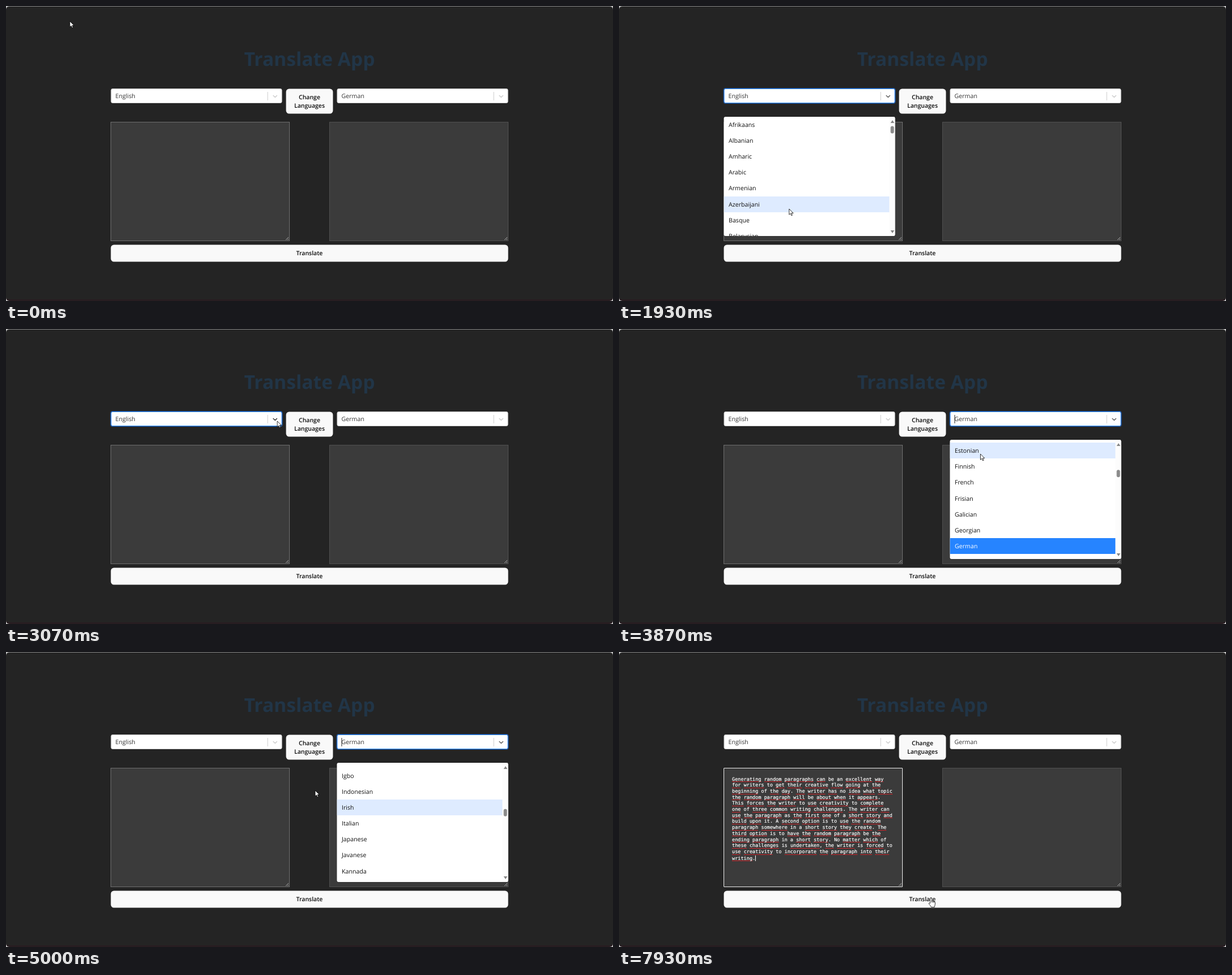
These frames come from a looping animation (1074x522 px, 8 s). An HTML page:

```html
<!DOCTYPE html>
<html lang="en">
<head>
<meta charset="utf-8">
<title>Translate App</title>
<style>
  html, body { margin: 0; width: 100%; height: 100%; overflow: hidden; }
  body {
    position: relative;
    background: #c9c9c9;
    font: 10.65px/16px "Open Sans", "Noto Sans", sans-serif;
    text-rendering: geometricPrecision;
    cursor: default;
  }
  body *, body *::before { box-sizing: border-box; }
  .page, .select, .menu, .area, .btn, h1, #cursor, .opt, .bar, .thumb { position: absolute; }
  .page { inset: 0; background: #242424; border-radius: 6px; border-top: 1px solid #858585; border-bottom: 3px solid #281d21; }
  h1 {
    left: 0; top: 73px; width: 1074px; margin: 0; text-align: center;
    font-size: 33.7px; line-height: 40px; font-weight: 700; color: #213547;
  }

  .select, .menu, .btn { transform: translateX(.5px); }
  .select {
    top: 146px; width: 303px; height: 26px; padding: 1px 0 0 7px; line-height: 24px;
    background: #fff; border: 1px solid #d4d4d4; border-radius: 3px; color: #333;
  }
  .select.focus { border-color: #2684ff; box-shadow: 0 0 0 1px #2684ff66; }
  .select svg { position: absolute; left: 282.5px; top: 6px; width: 13.3px; height: 13.3px; }
  .select path { fill: none; stroke: #ccc; stroke-width: 2.1; stroke-linecap: round; stroke-linejoin: round; }
  .select.focus path { stroke: #5c5c5c; }
  .select.hot path { stroke: #2c2c2c; }
  .select::before { content: ""; position: absolute; left: 276px; top: 5px; width: 1px; height: 15px; background: #ccc; }
  .select i { position: absolute; left: 7px; top: 5px; width: 1px; height: 15px; background: #222; }

  .menu {
    top: 196px; width: 303px; height: 211px; overflow: hidden;
    background: #fff; border-radius: 3px; box-shadow: 0 0 0 1px #0000001a;
  }
  .opt { left: 0; width: 292.5px; height: 28.1px; padding: 1px 0 0 8.5px; line-height: 28.1px; color: #111; }
  .opt.focus { background: #deebff; }
  .opt.chosen { background: #2684ff; color: #fff; }
  .bar { left: 292.5px; top: 0; width: 10.5px; height: 211px; background: #fcfcfc; }
  .bar svg { position: absolute; left: 0; top: 0; width: 11px; height: 211px; fill: #858585; }
  .thumb { left: 2px; top: 0; width: 6px; height: 13px; border-radius: 3px; background: #8b8b8b; }

  .btn {
    display: flex; align-items: center; justify-content: center; text-align: center; padding-top: 2px;
    background: #f9f9f9; border-radius: 5.5px; color: #0a0a0a; font-size: 10.5px; line-height: 15.5px; font-weight: 600;
    transform: translate(.5px, .5px);
  }
  .btn.focus { box-shadow: 0 0 0 1px #fff, inset 0 0 0 1px #101010; }

  .area {
    top: 205px; width: 317px; height: 211px; padding: 14.65px 14px; background: #3b3b3b; border: 1px solid #6f6f6f; color: #fff;
    font: 8.57px/10.69px "DejaVu Sans Mono", monospace; white-space: pre; -webkit-text-stroke: .2px #fff;
  }
  .area.off { border-color: #505050; }
  .area.focus { border-color: #eee; border-radius: 1px; }
  .area > svg { position: absolute; right: 0; bottom: 0; width: 7px; height: 7px; stroke: #c8c8c8; stroke-width: .8; }
  .area i { display: inline-block; width: 1px; height: 10px; margin-right: -1px; vertical-align: -2px; background: #fff; }
  .area b { font-weight: 400; }
  .checked b { background: repeating-linear-gradient(90deg, #e0242a 0 1.5px, #b3272c 1.5px 2.7px) 0 100% / 100% 1.4px no-repeat; }

  #cursor { left: 0; top: 0; width: 16px; height: 20px; overflow: visible; fill: #fff; stroke: #000; stroke-width: .8; stroke-linejoin: round; }
  [hidden] { display: none !important; }
</style>
</head>
<body>
<div class="page"></div>
<h1>Translate App</h1>

<div class="select" style="left:185px"></div>
<div class="btn" id="swap" style="left:495px;top:146px;width:83px;height:44px">Change<br>Languages</div>
<div class="select" style="left:585px"></div>

<div class="area" id="input" style="left:185px"><span id="text"></span><i id="caret"></i><svg viewBox="0 0 7 7"><path d="M1 6L6 1M4 6L6 4"/></svg></div>
<div class="area off" style="left:572px"><svg viewBox="0 0 7 7"><path d="M1 6L6 1M4 6L6 4"/></svg></div>
<div class="btn" style="left:185px;top:422px;width:703px;height:30px">Translate</div>

<div class="menu" style="left:185px"></div>
<div class="menu" style="left:585px"></div>

<svg id="cursor">
  <path id="arrow" d="M0 0V10.3L2.4 8.1L4 11.8L5.7 11.1L4.1 7.5H7.4Z"/>
  <path id="hand" d="M-1.3 8.5V1.3a1.3 1.3 0 0 1 2.6 0V5.6c1-.5 1.9-.3 2.3.5 1-.4 1.8 0 2.1.7 1.2-.2 1.9.6 1.8 2l-.3 3.4c-.1 1.3-.9 2.4-1 4.2H.5c-.6-1.8-2.5-3.6-3.9-5.5-1-1.5.6-2.9 2.1-1.2zM1.3 5.6V8.3M3.6 6.1V8.5M5.7 6.8V8.8"/>
</svg>

<script>
const LOOP = 8000, STEP = 200 / 3, ROW = 28.1, BLINK = 530;
const $ = id => document.getElementById(id);

const languages = ("Afrikaans,Albanian,Amharic,Arabic,Armenian,Azerbaijani,Basque,Belarusian,Bengali,Bosnian," +
  "Bulgarian,Catalan,Cebuano,Chinese (Simplified),Chinese (Traditional),Corsican,Croatian,Czech,Danish,Dutch," +
  "English,Esperanto,Estonian,Finnish,French,Frisian,Galician,Georgian,German,Greek,Gujarati,Haitian Creole," +
  "Hausa,Hawaiian,Hebrew,Hindi,Hmong,Hungarian,Icelandic,Igbo,Indonesian,Irish,Italian,Japanese,Javanese," +
  "Kannada,Kazakh,Khmer,Kinyarwanda,Korean,Kurdish,Kyrgyz,Lao").split(",");

const paragraph = `Generating random paragraphs can be an excellent way
for writers to get their creative flow going at the
beginning of the day. The writer has no idea what topic
the random paragraph will be about when it appears.
This forces the writer to use creativity to complete
one of three common writing challenges. The writer can
use the paragraph as the first one of a short story and
build upon it. A second option is to use the random
paragraph somewhere in a short story they create. The
third option is to have the random paragraph be the
ending paragraph in a short story. No matter which of
these challenges is undertaken, the writer is forced to
use creativity to incorporate the paragraph into their
writing.`;

// Times in ms; scroll is a list of [time, offset].
const pickers = [
  { chosen: 20, focus: [1267, 3700], open: [1267, 2990], hover: [1400, 2780], last: 0,
    hot: [2870, 3260], scroll: [[1460, 389], [1900, 0]] },
  { chosen: 28, focus: [3700, 5260], open: [3700, 5260], hover: [3830, 4900], last: 41,
    hot: [0, 0], scroll: [[3950, 613], [4267, 711.4], [4740, 1087]] },
];
const swapped = [5260, 5790], swapFocus = [5260, 6790];
const typing = 6790, paste = 7325, check = 7795;

// [time, x, y] of the pointer tip
const path = [
  [300, 113, 27], [333, 112, 27], [430, 112, 27], [1130, 300, 160], [1330, 300, 161], [1600, 301, 359],
  [2330, 301, 359], [2930, 480, 163], [3190, 480, 163], [3600, 640, 160], [3740, 640, 161], [4000, 639, 286],
  [4780, 639, 286], [5000, 547, 245], [5200, 532, 160], [5470, 532, 159], [5660, 532, 159], [5930, 532, 157],
  [6500, 532, 157], [6800, 490, 330], [6867, 540, 425], [7780, 540, 425], [7933, 552, 435],
];

const within = (t, [from, to]) => t >= from && t < to;

function along(keys, t, ease = k => k) {
  if (t <= keys[0][0]) return keys[0].slice(1);
  const i = keys.findIndex(k => k[0] > t);
  if (i < 0) return keys[keys.length - 1].slice(1);
  const a = keys[i - 1], b = keys[i], k = ease((t - a[0]) / (b[0] - a[0]));
  return a.slice(1).map((v, n) => v + (b[n + 1] - v) * k);
}
const smooth = k => k * k * (3 - 2 * k);

const selects = document.querySelectorAll(".select"), menus = document.querySelectorAll(".menu");
pickers.forEach((p, i) => {
  p.box = selects[i];
  p.box.innerHTML = '<span></span><i></i><svg viewBox="0 0 20 20"><path d="M5.2 8.3L10 12.9L14.8 8.3"/></svg>';
  [p.label, p.caret] = p.box.children;
  p.menu = menus[i];
  p.menu.innerHTML = languages.map(name => `<div class="opt">${name}</div>`).join("") +
    '<div class="bar"><svg><path d="M2 11L5.3 6L8.6 11ZM2 201L5.3 206L8.6 201Z"/></svg><div class="thumb"></div></div>';
  p.options = p.menu.querySelectorAll(".opt");
  p.thumb = p.menu.querySelector(".thumb");
});
$("text").innerHTML = paragraph.replace(/[A-Za-z]{3,}/g, "<b>$&</b>");

function drawPicker(p, t, y, chosen) {
  const focused = within(t, p.focus), open = within(t, p.open);
  p.label.textContent = languages[chosen];
  p.box.classList.toggle("focus", focused);
  p.box.classList.toggle("hot", within(t, p.hot));
  p.caret.hidden = !focused || Math.floor((t - p.focus[0]) / BLINK) % 2 === 1;
  p.menu.hidden = !open;
  if (!open) return;
  const [scroll] = along(p.scroll, t);
  let hovered = p.last;
  if (t < p.hover[1]) hovered = t < p.hover[0] || y < 196 ? -1 : Math.floor((y - 196 + scroll) / ROW);
  p.options.forEach((o, i) => {
    o.style.top = i * ROW - scroll + "px";
    o.classList.toggle("focus", i === hovered);
    o.classList.toggle("chosen", i === chosen);
  });
  p.thumb.style.transform = `translateY(${16.5 + scroll * .06}px)`;
}

function draw(now) {
  const t = Math.floor((now % LOOP + 4) / STEP) * STEP;
  const [x, y] = along(path, t, smooth);
  const flip = within(t, swapped);

  pickers.forEach((p, i) => drawPicker(p, t, y, pickers[flip ? 1 - i : i].chosen));
  $("swap").classList.toggle("focus", within(t, swapFocus));
  $("input").classList.toggle("focus", t >= typing);
  $("input").classList.toggle("checked", t >= check);
  $("caret").hidden = t < typing;
  $("text").hidden = t < paste;

  const onSwap = x > 495 && x < 579 && y > 146 && y < 191;
  const pointing = y > 422 || (onSwap && t > 5000);
  $("hand").style.display = pointing ? "" : "none";
  $("arrow").style.display = pointing ? "none" : "";
  $("cursor").style.transform = `translate(${x}px, ${y}px)`;
  requestAnimationFrame(draw);
}
requestAnimationFrame(draw);
</script>
</body>
</html>
```
